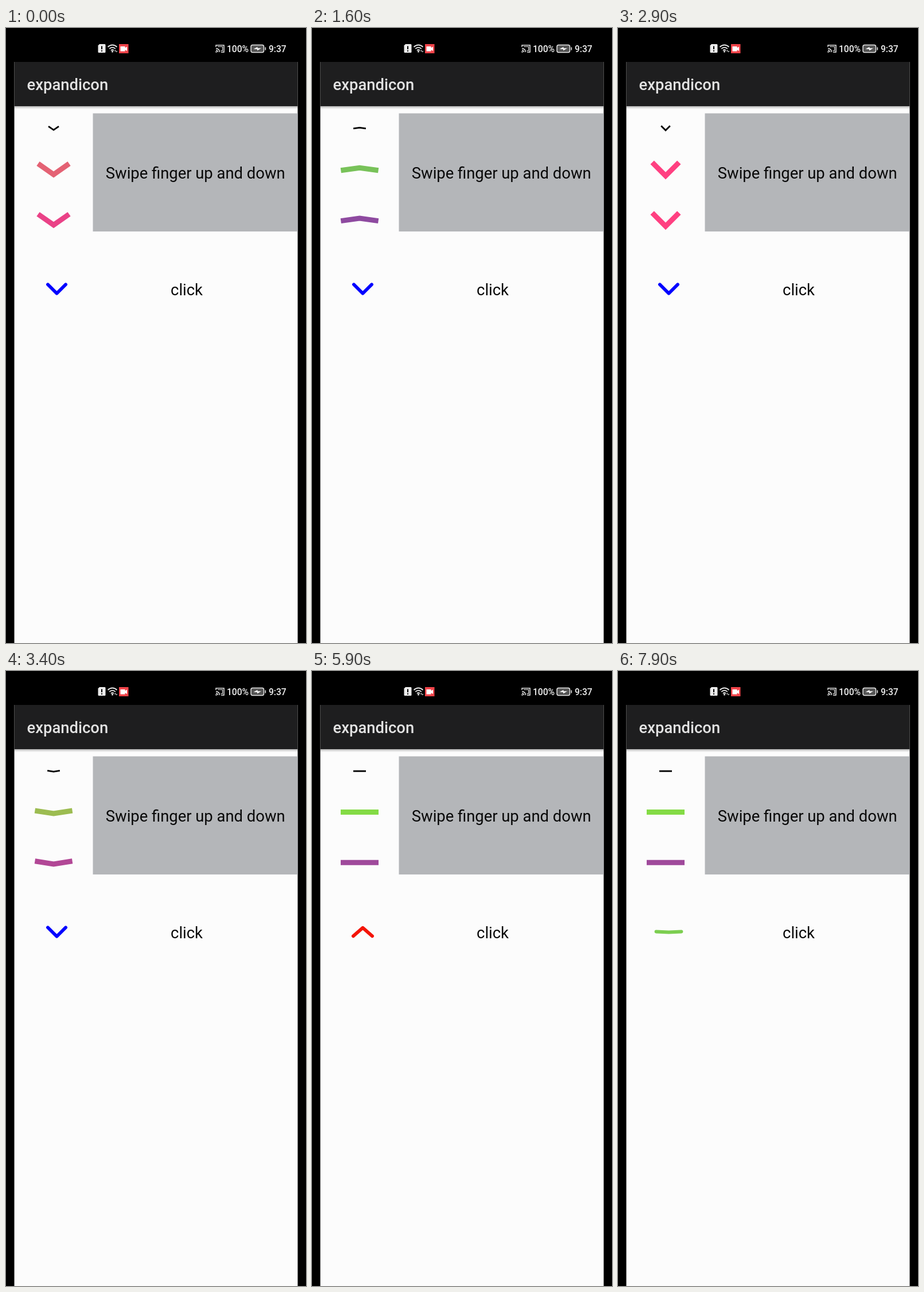
An HTML page that plays this animation: 523x1070 px, repeating every 8000 ms.

```html
<!DOCTYPE html>
<html lang="en">
<head>
<meta charset="utf-8">
<title>expandicon</title>
<style>
  html, body { margin: 0; width: 100%; height: 100%; overflow: hidden; background: #000; }
  svg { display: block; width: 100vw; height: 100vh; }
  text { font-family: Roboto, sans-serif; font-size: 27.4px; }
  .status { font-size: 15.6px; font-weight: 500; fill: #f0f0f0; }
  .line { fill: none; stroke: #e8e8e8; }
</style>
</head>
<body>
<svg viewBox="0 0 523 1070">
  <defs>
    <linearGradient id="shadow" x2="0" y2="1">
      <stop stop-color="#000" stop-opacity=".28"/>
      <stop offset="1" stop-color="#000" stop-opacity="0"/>
    </linearGradient>
  </defs>
  <rect width="523" height="1070" fill="#000"/>
  <rect x="14.5" y="59" width="494" height="1011" fill="#fcfcfc"/>
  <rect x="14.5" y="59" width="494" height="77" fill="#1e1e1f"/>
  <rect x="14.5" y="136" width="494" height="5" fill="url(#shadow)"/>
  <rect x="151.5" y="148.5" width="357" height="205.5" fill="#b4b6b9"/>

  <!-- status bar -->
  <path d="M163 28h9q1.500 0 1.500 1.500v12q0 1.500-1.500 1.500h-10q-1.500 0-1.500-1.500v-11z" fill="#ececec"/>
  <path d="M167 31.500v5.500M167 38.800v2" stroke="#000" stroke-width="2"/>
  <g class="line" stroke-width="1.700">
    <path d="M177.500 33q8-7 16 0M180.200 36.200q5.300-4.500 10.600 0M183 39q2.500-2 5 0"/>
    <path d="M189 40.500l1.500-2 1.500 2M191 40l1.500 2 1.500-2" stroke-width="1"/>
  </g>
  <circle cx="185.500" cy="41" r="1.500" fill="#e8e8e8"/>
  <rect x="197" y="28" width="16.500" height="16" fill="#f0444a"/>
  <path d="M199.500 32h8v2.500l3.500-2v7.500l-3.500-2v2.500h-8z" fill="#fff"/>
  <g class="line" stroke-width="1.500">
    <path d="M366 33v-3h14v12h-5M366 35.500a6.500 6.500 0 0 1 6.500 6.500M366 38.500a3.500 3.500 0 0 1 3.500 3.500"/>
    <path d="M369 32.500h8.500v7h-3" stroke-width="1.200"/>
  </g>
  <circle cx="366.500" cy="41.500" r="1.200" fill="#e8e8e8"/>
  <text class="status" x="385" y="42">100%</text>
  <rect x="427" y="29.500" width="22.500" height="13" rx="3" fill="#555" stroke="#e8e8e8" stroke-width="1.500"/>
  <path d="M452.300 33.500v5" stroke="#e8e8e8" stroke-width="1.600"/>
  <path d="M431.500 36.500l7-3.500v2.300h6.500l-7 4v-2.300z" fill="#fff"/>
  <text class="status" x="458" y="42">9:37</text>

  <text x="36.500" y="108" font-weight="500" fill="#e2e2e2">expandicon</text>
  <text x="330.200" y="262" text-anchor="middle" fill="#080808">Swipe finger up and down</text>
  <text x="315" y="464.500" text-anchor="middle" fill="#080808">click</text>
  <g id="icons" fill="none"></g>
</svg>
<script>
const LOOP = 8000, STEP = 100, CLICK_DURATION = 1200;
const PINK = [255, 64, 129], GREEN = [132, 219, 69], INDIGO = [63, 81, 181];
const BLUE = [0, 0, 255], RED = [255, 0, 0], BLACK = [0, 0, 0];

// Time in ms and chevron angle in degrees: 45 points down, -45 points up.
const swipeKeys = [[0, 35], [700, -8], [1650, -8], [2700, 45], [2900, 45], [3600, 0]];
const clickTimes = [4446, 5846, 7336];

const clamp = x => Math.min(1, Math.max(0, x));
const lerp = (a, b, x) => a + (b - a) * x;
const smooth = x => x * x * (3 - 2 * x);

function swipeAngle(t) {
  const next = swipeKeys.findIndex(key => key[0] > t);
  if (next < 0) return swipeKeys.at(-1)[1];
  const [t0, a0] = swipeKeys[next - 1], [t1, a1] = swipeKeys[next];
  return lerp(a0, a1, smooth((t - t0) / (t1 - t0)));
}

function clickAngle(t) {
  return clickTimes.reduce((angle, start, i) =>
    angle + (i % 2 ? 90 : -90) * clamp((t - start) / CLICK_DURATION), 45);
}

function mixColors(colors, fraction) {
  const position = fraction * (colors.length - 1);
  const i = Math.min(Math.floor(position), colors.length - 2);
  const channels = colors[i].map((c, k) => Math.round(lerp(c, colors[i + 1][k], position - i)));
  return `rgb(${channels})`;
}

function makeIcon(x, y, arm, width, colors, angleAt, shape = "butt") {
  const path = document.createElementNS("http://www.w3.org/2000/svg", "path");
  path.setAttribute("stroke-width", width);
  path.setAttribute("stroke-linecap", shape);
  path.setAttribute("stroke-linejoin", shape === "round" ? "round" : "miter");
  document.getElementById("icons").append(path);
  return t => {
    const angle = angleAt(t), radians = angle * Math.PI / 180;
    const dx = arm * Math.cos(radians), dy = arm * Math.sin(radians) / 2;
    path.setAttribute("d", `M${x - dx} ${y - dy}L${x} ${y + dy}L${x + dx} ${y - dy}`);
    path.setAttribute("stroke", mixColors(colors, (45 - angle) / 90));
  };
}

const icons = [
  makeIcon(83, 174.2, 11, 2.8, [BLACK, BLACK], swipeAngle),
  makeIcon(83, 245.5, 33, 9, [PINK, GREEN, INDIGO], swipeAngle),
  makeIcon(83, 333.3, 33, 9, [PINK, INDIGO], swipeAngle),
  makeIcon(88.5, 454, 22, 5.8, [BLUE, GREEN, RED], clickAngle, "round"),
];

const startTime = performance.now();
function draw() {
  const elapsed = (performance.now() - startTime) % LOOP;
  const t = Math.floor(elapsed / STEP) * STEP;
  icons.forEach(update => update(t));
  requestAnimationFrame(draw);
}
draw();
</script>
</body>
</html>
```
